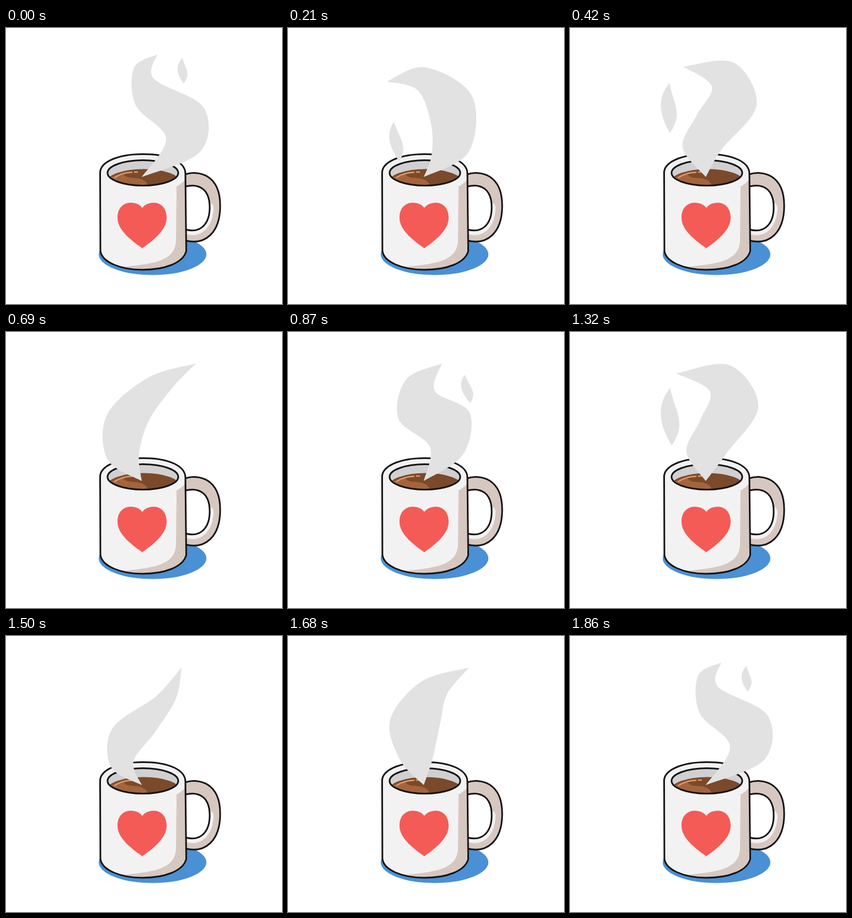
Write an HTML page that moves like this. It is 500 px wide and 500 px high and loops after 1.89 s.

```html
<!DOCTYPE html>
<html lang="en">
<head>
<meta charset="utf-8">
<title>Steaming mug</title>
<style>
  html, body { margin: 0; width: 100%; height: 100%; overflow: hidden; background: #fff; }
  svg { display: block; width: 100%; height: 100%; }
  .line { fill: none; stroke: #141414; stroke-width: 3; stroke-linejoin: round; }
</style>
</head>
<body>
<svg viewBox="0 0 500 500">
  <defs>
    <path id="body" d="M171 404L170.5 264C169 243 202 228.500 248 228.500S325 242 325 264L326.500 404C321 426 287 438 247 438S174 424 171 404Z"/>
    <ellipse id="mouth" cx="248" cy="262.500" rx="64" ry="23"/>
    <clipPath id="inBody"><use href="#body"/></clipPath>
    <clipPath id="inMouth"><use href="#mouth"/></clipPath>
  </defs>
  <ellipse cx="265.500" cy="410" rx="97.500" ry="37.500" fill="#4a90d4"/>

  <path d="M325 265C346 258 388 263 388 322C388 372 360 394 325 385Z" fill="#d6c8c0"/>
  <path d="M325 365C353 372 369 350 369 318Q376 316 376 328C374 362 353 382 325 373Z" fill="#f2f2f2"/>
  <path d="M325 287C350 281 369 292 369 325C369 353 354 373 325 365Z" fill="#fff"/>
  <path class="line" d="M325 265C346 258 388 263 388 322C388 372 360 394 325 385M325 287C350 281 369 292 369 325C369 353 354 373 325 365"/>

  <use href="#body" fill="#f2f2f2"/>
  <path clip-path="url(#inBody)" d="M328 270Q321 281 309 287L308 382C308 416 284 428 204 433L250 445L330 430Z" fill="#d6c8c0"/>
  <use href="#body" class="line"/>

  <g clip-path="url(#inMouth)">
    <use href="#mouth" fill="#d0d0d2"/>
    <ellipse cx="249" cy="279.500" rx="67" ry="24" fill="#7b4a2a"/>
    <path d="M184 274Q200 264 214 264Q212 271 235 272Q257 274 257 289H184Z" fill="#a4643c"/>
    <path d="M197 271Q209 262 228 261.500M233 261H238" fill="none" stroke="#e09a66" stroke-width="2.500" stroke-linecap="round"/>
  </g>
  <use href="#mouth" class="line"/>

  <path d="M247 326C238 312 202 310 202 344C202 368 232 388 247 399C262 388 291 368 291 344C291 310 256 312 247 326Z" fill="#f45b57"/>
  <path id="steam" fill="#e2e2e2"/>
</svg>
<script>
const LOOP = 1890, WAVE = 930, STEP = 30, FOOT = [246, 270];
const steam = document.getElementById('steam');

// A pose of the plume: its tip, three points down the left edge, three up the right.
const pose = (time, tip, left, right) => ({ time, pts: [tip, ...left, FOOT, ...right] });
const shift = (p, dt) => ({ ...p, time: p.time + dt });

const poses = [
  pose(0, [274, 48], [[232, 72], [235, 140], [290, 200]], [[352, 224], [358, 144], [268, 92]]),
  pose(240, [172, 100], [[236, 116], [259, 175], [254, 232]], [[322, 224], [331, 122], [250, 69]]),
  pose(420, [205, 70], [[257, 106], [229, 159], [204, 216]], [[274, 221], [338, 140], [297, 63]]),
  pose(570, [318, 57], [[272, 109], [193, 167], [190, 237]], [[231, 227], [270, 174], [308, 113]]),
  pose(690, [344, 57], [[257, 83], [183, 150], [184, 231]], [[241, 222], [258, 162], [299, 104]]),
  pose(870, [279, 57], [[214, 86], [200, 157], [257, 208]], [[317, 222], [329, 146], [266, 107]])
];
const plume = [shift(poses[5], -WAVE), ...poses, shift(poses[0], WAVE), shift(poses[1], WAVE)];

// Detached puffs: they drift in a line, swell and shrink away.
const wisps = [
  { born: 120, life: 420, from: [204, 232], to: [171, 110], w: 20, h: 58 },
  { born: 780, life: 225, from: [332, 142], to: [315, 45], w: 11, h: 27 }
];

const mix = (a, b, u) => a + (b - a) * u;

// Smooth (Hermite) motion through the poses.
function plumeAt(t) {
  const i = plume.findIndex(k => k.time > t) - 1;
  const [p, a, b, q] = plume.slice(i - 1, i + 3);
  const span = b.time - a.time, u = (t - a.time) / span, v = 1 - u;
  return a.pts.map((pt, n) => pt.map((x, c) => {
    const y = b.pts[n][c];
    const m = (y - p.pts[n][c]) / (b.time - p.time) * span;
    const k = (q.pts[n][c] - x) / (q.time - a.time) * span;
    return (1 + 2 * u) * v * v * x + u * v * v * m + u * u * (3 - 2 * u) * y - u * u * v * k;
  }));
}

// Catmull-Rom curve as Bézier segments.
function edge(pts) {
  const at = i => pts[Math.max(0, Math.min(pts.length - 1, i))];
  const ctrl = (i, s) => at(i).map((x, c) => x + s * (at(i + 1)[c] - at(i - 1)[c]) / 6);
  return pts.slice(1).map((p, i) => `C${ctrl(i, 1)} ${ctrl(i + 1, -1)} ${p}`).join('');
}

function plumePath(t) {
  const pts = plumeAt(t);
  return `M${pts[0]}${edge(pts.slice(0, 5))}${edge([...pts.slice(4), pts[0]])}Z`;
}

function wispPath({ born, life, from, to, w, h }, t) {
  const p = (t - born + WAVE) % WAVE / life;
  if (p >= 1) return '';
  const size = Math.sin(Math.PI * p), lean = 15 * (0.75 - p) * size;
  const at = (x, y) => [
    mix(from[0], to[0], p) + x * w * size + y * lean,
    mix(from[1], to[1], p) + y * h * size
  ];
  const top = at(0, -1);
  return `M${top}C${at(-1.4, -0.4)} ${at(-1.3, 0.2)} ${at(0, 1)}C${at(1.6, 0.2)} ${at(0.5, -0.1)} ${top}Z`;
}

function draw(now) {
  const t = Math.floor(now % LOOP / STEP) * STEP % WAVE;
  steam.setAttribute('d', plumePath(t) + wisps.map(w => wispPath(w, t)).join(''));
}

let start;
function tick(now) {
  start ??= now;
  draw(now - start);
  requestAnimationFrame(tick);
}
draw(0);
requestAnimationFrame(tick);
</script>
</body>
</html>
```
